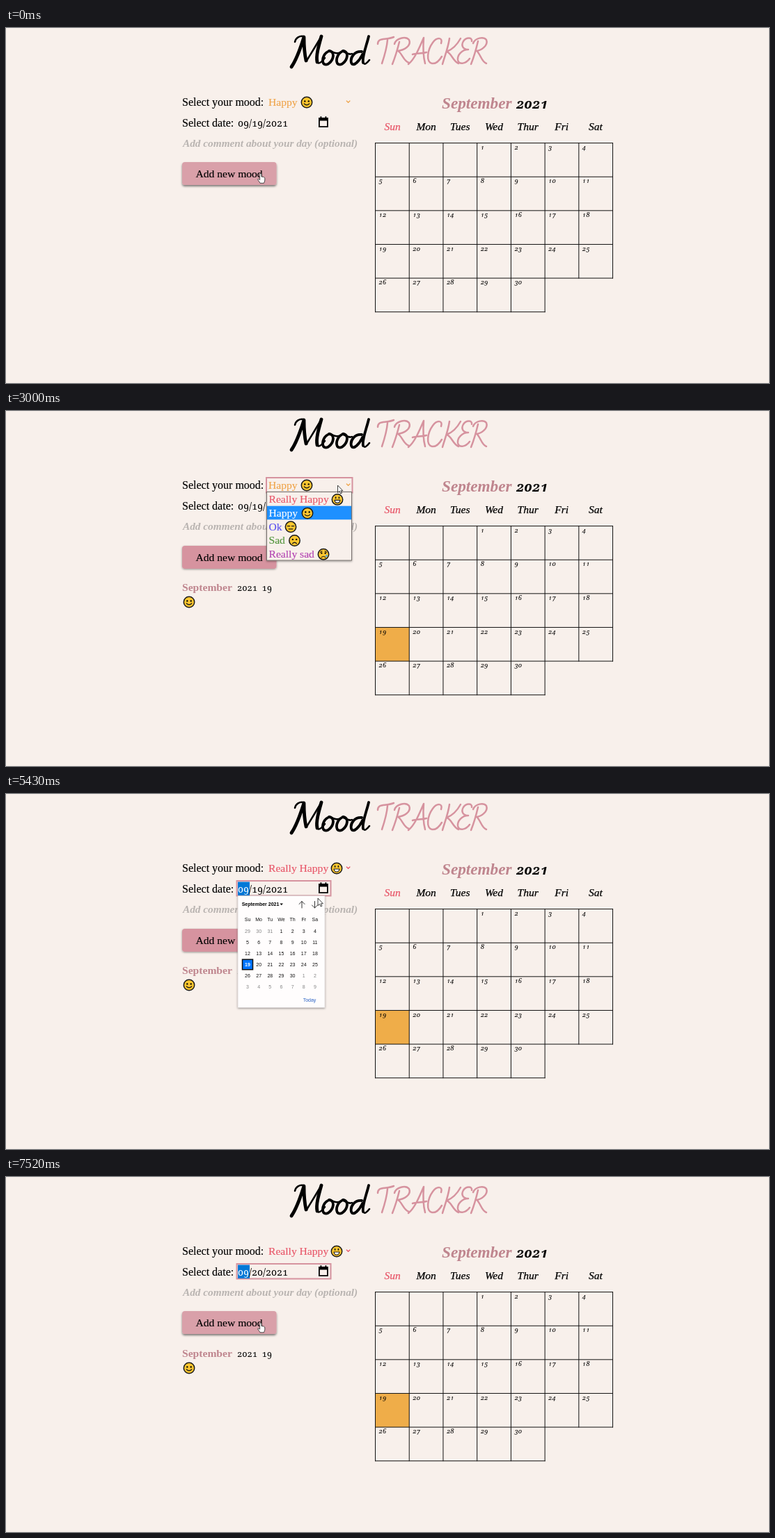
Animation of 1096x511 px, one loop 8000 ms. Source, as an HTML page:

```html
<!DOCTYPE html>
<html lang="en">
<head>
<meta charset="utf-8">
<title>Mood tracker</title>
<style>
  html, body { margin: 0; width: 100%; height: 100%; overflow: hidden; background: #f8f0eb; }
  svg { display: block; width: 100%; height: 100%; }
  text { font: 15.6px "Liberation Serif", "Noto Serif", serif; fill: currentColor; stroke: currentColor; stroke-width: .15px; white-space: pre; }
  .label { font-size: 16px; }
  .bold { font-weight: bold; stroke: none; }
  .hint { font: italic bold 15.3px "Liberation Serif", serif; stroke: none; }
  .month { font: italic bold 23.2px "Liberation Serif", serif; stroke: none; }
  .week { font: italic 15.5px "Liberation Serif", serif; stroke-width: .25px; text-anchor: middle; }
  .year, .date, .added, .day { font-family: "Noto Serif", serif; font-variant-numeric: oldstyle-nums; stroke: none; }
  .year { font-size: 19.6px; font-style: italic; font-weight: bold; }
  .date { font-size: 13.8px; }
  .added { font-size: 12.5px; }
  .day { font-size: 9.4px; font-style: italic; }
  .pick { font: 7px "Liberation Sans", Arial, sans-serif; stroke: none; text-anchor: middle; }
  .pick.bold { font-weight: bold; }
  .ink { fill: none; stroke-linecap: round; stroke-linejoin: round; }
</style>
</head>
<body>
<svg id="stage" viewBox="0 0 1096 511"></svg>
<script>
const LOOP = 8000;
const PAPER = '#f8f0eb', PINK = '#d6939f', ROSE = '#bf858e', ORANGE = '#efa54c', RED = '#e8586a';

// Cursor stops: time, x, y, hand
const CURSOR = [
  [0, 366, 209.5, 1], [1080, 371, 201.5, 1], [1200, 382, 188], [1320, 393, 164], [1440, 401, 145],
  [1590, 446, 121], [1710, 475.5, 108], [1850, 476.5, 107], [3400, 476.5, 112], [3550, 475, 113],
  [3670, 474.5, 114], [3820, 473.5, 117], [3980, 468.5, 125], [4630, 467.5, 129], [4770, 464, 133],
  [4900, 459.5, 137], [5430, 448, 150], [5550, 430, 176], [5670, 408, 206], [5790, 391, 229],
  [5910, 378, 241], [6060, 366, 244], [7160, 366, 238], [7280, 366, 224, 1], [7400, 366, 214, 1],
  [7520, 366, 210, 1]
];

const MOODS = [
  { name: 'Really Happy', color: RED, face: 'grin', faceX: 476 },
  { name: 'Happy', color: ORANGE, face: 'smile', faceX: 433 },
  { name: 'Ok', color: '#5a50ee', face: 'flat', faceX: 409 },
  { name: 'Sad', color: '#55963f', face: 'frown', faceX: 414.5 },
  { name: 'Really sad', color: '#b344b2', face: 'worry', faceX: 456 }
];

const range = (n, fn) => Array.from({ length: n }, (_, i) => fn(i)).join('');
const text = (x, y, str, color = '#000', cls = '', id = '') =>
  `<text x="${x}" y="${y}" class="${cls}" color="${color}" ${id && `id="${id}"`}>${str}</text>`;
const rect = (x, y, w, h, attrs) => `<rect x="${x}" y="${y}" width="${w}" height="${h}" ${attrs}/>`;
const ink = (d, color, width) => `<path class="ink" d="${d}" stroke="${color}" stroke-width="${width}"/>`;
const group = (id, body) => `<g id="${id}">${body}</g>`;
const frame = (x, y, w, h, id) => rect(x, y, w, h, `id="${id}" fill="none" stroke="${PINK}" stroke-width="2"`);

function face(x, y, kind) {
  const mouth = {
    smile: ink('M-3.7 2Q0 5.6 3.7 2', '#1a1a1a', 1.3),
    grin: '<path d="M-3.9 1H3.9Q3.5 5 0 5T-3.9 1Z" fill="#fff" stroke="#1a1a1a" stroke-width="1.1"/>',
    flat: ink('M-2.8 3H2.8', '#1a1a1a', 1.3),
    frown: ink('M-2.9 4.2Q0 1.4 2.9 4.2', '#1a1a1a', 1.3),
    worry: ink('M-2.9 4.6Q0 1.6 2.9 4.6M-4.6 -3L-2 -4.4M4.6 -3L2 -4.4', '#1a1a1a', 1.1) +
      '<circle cx="4.3" cy="2.2" r="1.5" fill="#4fa9e8"/>'
  }[kind];
  const eyes = kind === 'flat'
    ? ink('M-4.6 -1.2H-1.4M1.4 -1.2H4.6', '#1a1a1a', 1.4)
    : kind === 'grin'
      ? ink('M-2.4 -3.4V-2M2.4 -3.4V-2', '#1a1a1a', 1.7)
      : '<circle cx="-2.7" cy="-1.6" r="1.2"/><circle cx="2.7" cy="-1.6" r="1.2"/>';
  return `<g transform="translate(${x} ${y})"><circle r="7.7" fill="#fdc62f" stroke="#1a1a1a" stroke-width="1.5"/>${eyes}${mouth}</g>`;
}

function title() {
  const capital = 'M410 56C417 46 423 29 428 13C428 26 429 38 431 47M453 12C449 26 445 40 447 49';
  const links = 'M432 47C438 37 446 24 453 12M447 48C448 53 453 50 458 43M464 33C471 35 475 38 481 35' +
    'M483 33C489 36 493 39 497 37M513 50C515 54 519 50 522 46M415 20C416 14 422 11 427 12';
  const bowls = 'M465 33C457 35 453 45 456 51C460 56 469 49 470 40C470 36 468 33 464 33' +
    'M485 33C477 35 473 45 476 51C480 56 489 49 490 40C490 36 488 33 484 33' +
    'M511 34C501 33 494 42 496 50C499 57 508 47 512 38M521 12C518 25 511 42 513 50';
  const tracker = 'M534 23C534 13 545 18 557 13M548 17C547 30 543 42 540 51' +
    'M565 20C562 32 559 42 555 52M558 23C560 15 574 11 579 17C583 26 571 32 563 33C569 36 571 48 579 50' +
    'M578 52C587 45 594 28 600 14C599 27 599 40 602 51M584 38C590 36 597 37 604 35' +
    'M625 22C628 13 619 13 613 21C605 32 603 49 612 51C618 52 623 46 626 41' +
    'M637 15C635 29 630 41 627 52M653 15C648 24 641 31 633 34C640 36 642 48 650 51' +
    'M669 19C670 13 661 13 657 19C653 26 657 31 664 31C655 31 648 39 649 46C651 54 661 51 666 44' +
    'M678 19C675 32 672 42 668 52M671 22C674 14 686 12 690 17C693 25 683 32 676 33C681 36 683 49 690 51';
  return `<g role="img" aria-label="Mood TRACKER">${ink(capital, '#000', 4.8)}${ink(links, '#000', 2.5)}` +
    `${ink(bowls, '#000', 3.8)}${ink(tracker, PINK, 2.5)}</g>`;
}

function monthGrid() {
  const left = c => 530.5 + 48.72 * c;
  const top = r => 165.6 + 48.62 * r;
  const names = ['Sun', 'Mon', 'Tues', 'Wed', 'Thur', 'Fri', 'Sat'];
  const lines = range(8, c => `M${left(c)} ${top(0)}V${top(c < 6 ? 5 : 4)}`) +
    range(6, r => `M${left(0)} ${top(r)}H${left(r < 5 ? 7 : 5)}`);
  return text(626, 116, 'September', ROSE, 'month') + text(733, 116, '2021', '#000', 'year') +
    range(7, i => text(555 + 48.65 * i, 147, names[i], i ? '#000' : RED, 'week')) +
    rect(left(0), top(3), 48.7, 48.6, 'id="marked" fill="#efad49"') +
    `<path d="${lines}" fill="none" stroke="#111" stroke-linecap="square"/>` +
    range(30, i => text(left((i + 3) % 7) + 5, top(Math.floor((i + 3) / 7)) + 9.2, i + 1, '#000', 'day'));
}

function chosen(id, mood, faceX) {
  return group(id, text(377, 111.5, mood.name, mood.color) + face(faceX, 107, mood.face) +
    ink('M489.3 105L491.6 107.3L493.9 105', mood.color, 1.3));
}

function form() {
  return text(253, 111.5, 'Select your mood:', '#000', 'label') +
    chosen('really', MOODS[0], 475) + chosen('happy', MOODS[1], 432) + frame(374, 96, 123.5, 21.5, 'moodFocus') +
    text(253, 141.5, 'Select date:', '#000', 'label') +
    group('dateFocus', frame(331.5, 125, 135, 21.5, 'dateBox') + rect(333, 126.5, 17, 19.5, 'fill="#0078d7"')) +
    text(333, 141.5, '<tspan id="monthPart">09</tspan>/<tspan id="dayPart">19</tspan>/2021', '#000', 'date') +
    '<path d="M449 129h2.5v-1.8h1.8v1.8h5.2v-1.8h1.8v1.8h2.5v14h-13.8zM450.8 133.4v7.8h10.2v-7.8z" fill-rule="evenodd"/>' +
    text(254, 171, 'Add comment about your day (optional)', '#b9b4b1', 'hint') +
    group('button', rect(253, 193.5, 135.5, 33, 'id="face" rx="4"') + text(272.5, 215.7, 'Add new mood')) +
    group('ring', rect(252.5, 192.5, 137, 34.5, 'id="ringLine" fill="none" stroke="#c98492"') +
      ink('M254 196.5Q254 194 256.5 194M388 196.5Q388 194 385.5 194', '#f5e4e2', 1)) +
    group('entry', text(253, 259, 'September', ROSE, 'bold') + text(332, 259, '2021', '#000', 'added') +
      text(367.5, 259, '19', '#000', 'added') + face(263, 275, 'smile'));
}

function moodList() {
  return group('list', rect(374.5, 116.5, 122, 98.5, `fill="${PAPER}" stroke="#77706d" filter="url(#soft)"`) +
    rect(375, 117, 121, 19.6, 'id="option" fill="#1e90ff"') +
    MOODS.map((m, i) => text(377.5, 132.2 + 19.7 * i, m.name, m.color, '', 'mood' + i) +
      face(m.faceX, 127.4 + 19.7 * i, m.face)).join(''));
}

const STEP = 16.15;
const pickX = i => 347 + STEP * (i % 7), pickY = i => 197 + STEP * Math.floor(i / 7);

function datePicker() {
  const days = ['Su', 'Mo', 'Tu', 'We', 'Th', 'Fr', 'Sa'];
  return group('picker', rect(333, 146.5, 125, 161, 'fill="#fffdfd" stroke="#c9c4c4" stroke-width=".5" filter="url(#soft)"') +
    text(365.5, 161.3, 'September 2021', '#000', 'pick bold') + '<path d="M393.5 157.6h4.4l-2.2 2.6z"/>' +
    ink('M425 164V154.5M421 158.5L425 154.5L429 158.5M443.5 154.5V164M439.5 160L443.5 164L447.5 160', '#333', 1) +
    range(7, i => text(pickX(i), 182.7, days[i], '#111', 'pick')) +
    rect(-8, -8, 16, 16, 'id="over" fill="#a8cdfa"') +
    rect(-7.5, -7.3, 15, 14.6, 'id="picked" fill="#0075ff" stroke="#101010" stroke-width="1.5"') +
    range(42, i => text(pickX(i), pickY(i) + 2.6, i < 3 ? 29 + i : i < 33 ? i - 2 : i - 32,
      i < 3 || i > 32 ? '#858585' : '#111', 'pick', 'pick' + i)) +
    text(436, 298.5, 'Today', '#2a62c4', 'pick'));
}

const stage = document.getElementById('stage');
stage.innerHTML = `<defs>
  <filter id="soft" x="-20%" y="-20%" width="140%" height="150%"><feDropShadow dx="0" dy="1" stdDeviation="1.5" flood-opacity=".4"/></filter>
  <filter id="raised" x="-20%" y="-20%" width="140%" height="170%"><feDropShadow dx="0" dy="2" stdDeviation="1.7" flood-opacity=".5"/></filter>
</defs>` + rect(0, 0, 1096, 511, `fill="${PAPER}"`) + title() + monthGrid() + form() + moodList() + datePicker() +
  group('cursor', '<path id="arrow" d="M0 0V10.6L2.5 8.4L4.2 12L5.9 11.2L4.3 7.8H7.4Z" fill="#fff" stroke="#111" stroke-width=".8"/>' +
    '<path id="hand" d="M-1.4 1.2Q-1.4 0 -.2 0T1 1.2V4.6Q5.8 4.6 5.8 7V9.6Q5.6 11.6 4.4 13.8H-1Q-2.4 11.4 -4.2 9Q-4.2 7.2 -2.6 8L-1.4 9.2Z" fill="#fff" stroke="#222" stroke-width=".8"/>');

const el = {};
stage.querySelectorAll('[id]').forEach(node => el[node.id] = node);

const show = (id, on) => el[id].setAttribute('display', on ? 'inline' : 'none');
const move = (id, x, y) => el[id].setAttribute('transform', `translate(${x} ${y})`);

function render(t) {
  const during = (from, to = LOOP) => t >= from && t < to;
  const [, x, y, hand] = CURSOR.filter(stop => stop[0] <= t).pop();

  move('cursor', x, y);
  show('hand', hand);
  show('arrow', !hand);

  el.face.setAttribute('fill', hand ? '#d9a0a9' : PINK);
  el.face.setAttribute('filter', hand ? 'url(#raised)' : 'url(#soft)');
  move('button', 0, hand ? -.4 : .4);
  show('ring', during(120, 3000));
  el.ringLine.setAttribute('stroke-width', during(390) ? 2 : 1);
  show('entry', during(120));
  show('marked', during(120));

  show('happy', !during(4490));
  show('really', during(4490));
  show('moodFocus', during(3000, 5050));
  show('list', during(3000, 4490));
  const active = during(3980) ? 0 : 1;
  move('option', 0, 19.7 * active);
  MOODS.forEach((m, i) => el['mood' + i].setAttribute('color', i === active ? '#fff' : m.color));

  show('dateFocus', during(5050));
  el.monthPart.style.fill = during(5050) ? '#fff' : '';
  el.dayPart.textContent = during(6920) ? '20' : '19';

  show('picker', during(5170, 6920));
  const col = Math.round((x - 347) / STEP), row = Math.round((y - 197) / STEP);
  const over = row * 7 + col, picked = during(6770) ? 22 : 21;
  const hovering = row >= 0 && row < 6 && col >= 0 && col < 7 && over !== picked;
  show('over', hovering && during(5430, 6920));
  if (hovering) move('over', pickX(over), pickY(over));
  move('picked', pickX(picked), pickY(picked));
  for (const i of [21, 22]) {
    el['pick' + i].setAttribute('color', i === picked ? '#fff' : '#111');
    el['pick' + i].classList.toggle('bold', i === picked);
  }
}

const start = performance.now();
function tick() {
  render((performance.now() - start) % LOOP);
  requestAnimationFrame(tick);
}
tick();
</script>
</body>
</html>
```
